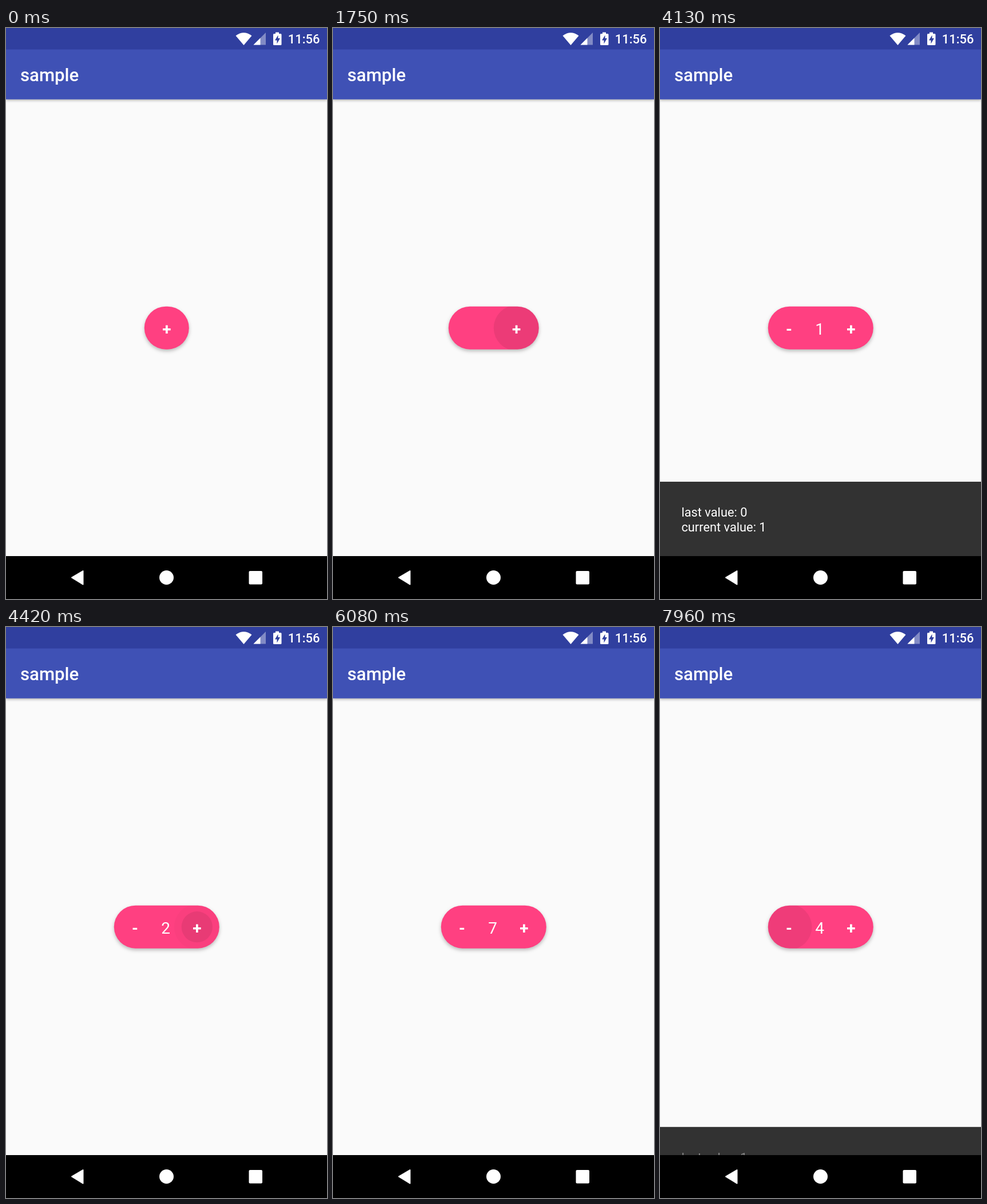
Recreate the animation shown at these times as an HTML page. Size 561 px wide and 998 px high, loop 8000 ms.

```html
<!DOCTYPE html>
<html lang="en">
<head>
<meta charset="utf-8">
<title>Counter button</title>
<style>
  html, body { margin: 0; width: 100%; height: 100%; overflow: hidden; background: #fafafa; }
  svg { display: block; width: 561px; height: 998px; font-family: Roboto, sans-serif; fill: #fff; }
  .medium { font-weight: 500; }
  .label { font-size: 28px; text-anchor: middle; }
  .bold { font-weight: 700; }
  #bar { filter: drop-shadow(0 2px 2px rgba(0, 0, 0, .28)); }
  #pill { filter: drop-shadow(0 3px 3px rgba(0, 0, 0, .26)); }
</style>
</head>
<body>
<svg viewBox="0 0 561 998">
  <defs><clipPath id="pillClip"><rect id="clipRect" y="486.7" height="75" rx="37.5"/></clipPath></defs>
  <rect width="561" height="998" fill="#fafafa"/>

  <rect id="bar" width="561" height="124.7" fill="#3f51b5"/>
  <rect width="561" height="37.5" fill="#303f9f"/>
  <path d="M401.5 13.5Q415.5 3 429.5 13.5L415.5 30Z"/>
  <path d="M454 8V29.5H432.5Z" opacity=".4"/>
  <path d="M444.5 17.5V29.5H432.5Z"/>
  <path d="M471 7.5h6v2.5h3q1.5 0 1.5 1.5v17q0 1.5-1.5 1.5h-11.500q-1.500 0-1.500-1.500v-17q0-1.500 1.500-1.500h2.500z"/>
  <path d="M475.500 12.500L470 21.500h3.500v6l5.500-9.500h-3.500z" fill="#303f9f"/>
  <text class="medium" x="548.5" y="27" font-size="22" text-anchor="end">11:56</text>
  <text class="medium" x="24.9" y="93" font-size="31.2">sample</text>

  <rect id="pill" y="486.7" height="75" rx="37.5" fill="#ff4081"/>
  <g id="ripples" clip-path="url(#pillClip)" fill="#000"></g>
  <text id="minus" class="label bold" x="225.5" y="536">-</text>
  <text id="number" class="label" x="279" y="536"></text>
  <text id="plus" class="label bold" y="536">+</text>

  <g id="snack">
    <rect y="793" width="561" height="132" fill="#323232"/>
    <g id="message" font-size="21.8">
      <text id="last" x="37.4" y="854"></text>
      <text id="current" x="37.4" y="880"></text>
    </g>
  </g>

  <rect y="923" width="561" height="75"/>
  <rect y="923" width="561" height="75" fill="#000"/>
  <path d="M115 960.500L134.500 949V972.500Z" stroke="#fff" stroke-width="2" stroke-linejoin="round"/>
  <circle cx="280.500" cy="960.500" r="12.500"/>
  <rect x="424.500" y="949" width="23.500" height="23.500" rx="2"/>
</svg>
<script>
const LOOP = 8000, CENTER = 280.8, TRAVEL = 53, TAP_GAP = 205, RELEASE = 70;
const el = id => document.getElementById(id);
const clamp = v => Math.min(1, Math.max(0, v));
const span = (t, start, length) => clamp((t - start) / length);
const inOut = p => (1 - Math.cos(Math.PI * p)) / 2;
const attrs = (node, values) => {
  for (const key in values) node.setAttribute(key, values[key]);
};

// cubic-bezier(.4, 0, .2, 1)
function fastOutSlowIn(x) {
  let lo = 0, hi = 1;
  for (let i = 0; i < 20; i++) {
    const u = (lo + hi) / 2, v = 1 - u;
    if (1.2 * u * v * v + 0.6 * u * u * v + u ** 3 < x) lo = u; else hi = u;
  }
  return lo * lo * (3 - 2 * lo);
}

const series = (start, count, step) =>
  Array.from({ length: count }, (_, i) => ({ at: start + i * TAP_GAP, step }));
const taps = [...series(4170, 6, 1), ...series(7400, 3, -1)];
const ripples = [{ at: 1530, step: 1 }, ...taps].map(tap => {
  const node = document.createElementNS("http://www.w3.org/2000/svg", "circle");
  el("ripples").append(node);
  return { ...tap, node };
});
const snacks = [
  { show: 2390, hide: 4160, last: 0, current: 1 },
  { show: 6080, hide: 7860, last: 1, current: 7 }
];

function drawButton(t) {
  const open = inOut(span(t, 1585, 248));
  const half = 39 + TRAVEL * open;
  const plusX = CENTER + TRAVEL * open;
  const box = { x: CENTER - half, width: 2 * half };
  attrs(el("pill"), box);
  attrs(el("clipRect"), box);
  attrs(el("plus"), { x: plusX });

  const fade = span(t, 1825, 150);
  attrs(el("minus"), { opacity: fade });
  attrs(el("number"), { opacity: fade });
  el("number").textContent =
    taps.reduce((sum, tap) => sum + (t >= tap.at + RELEASE ? tap.step : 0), 1);

  for (const { at, step, node } of ripples) {
    const age = t - at;
    const hold = at < 2000 ? 260 : 120;
    attrs(node, {
      cx: step > 0 ? plusX : 225.5,
      cy: 524.2,
      r: 40 * Math.sqrt(span(age, 0, 100)),
      opacity: 0.075 * span(age, 0, 50) * (1 - span(age, hold, 180))
    });
  }
}

function drawSnack(t) {
  const { show, hide, last, current } = snacks[t < 5500 ? 0 : 1];
  const rise = fastOutSlowIn(span(t, show, 250)) - fastOutSlowIn(span(t, hide, 250));
  const alpha = inOut(span(t, show + 70, 180)) - inOut(span(t, hide, 180));
  attrs(el("snack"), {
    transform: `translate(0 ${130 * (1 - rise)})`,
    visibility: rise > 0 ? "visible" : "hidden"
  });
  attrs(el("message"), { opacity: alpha });
  el("last").textContent = `last value: ${last}`;
  el("current").textContent = `current value: ${current}`;
}

function frame() {
  const t = performance.now() % LOOP;
  drawButton(t);
  drawSnack(t);
  requestAnimationFrame(frame);
}
frame();
</script>
</body>
</html>
```
